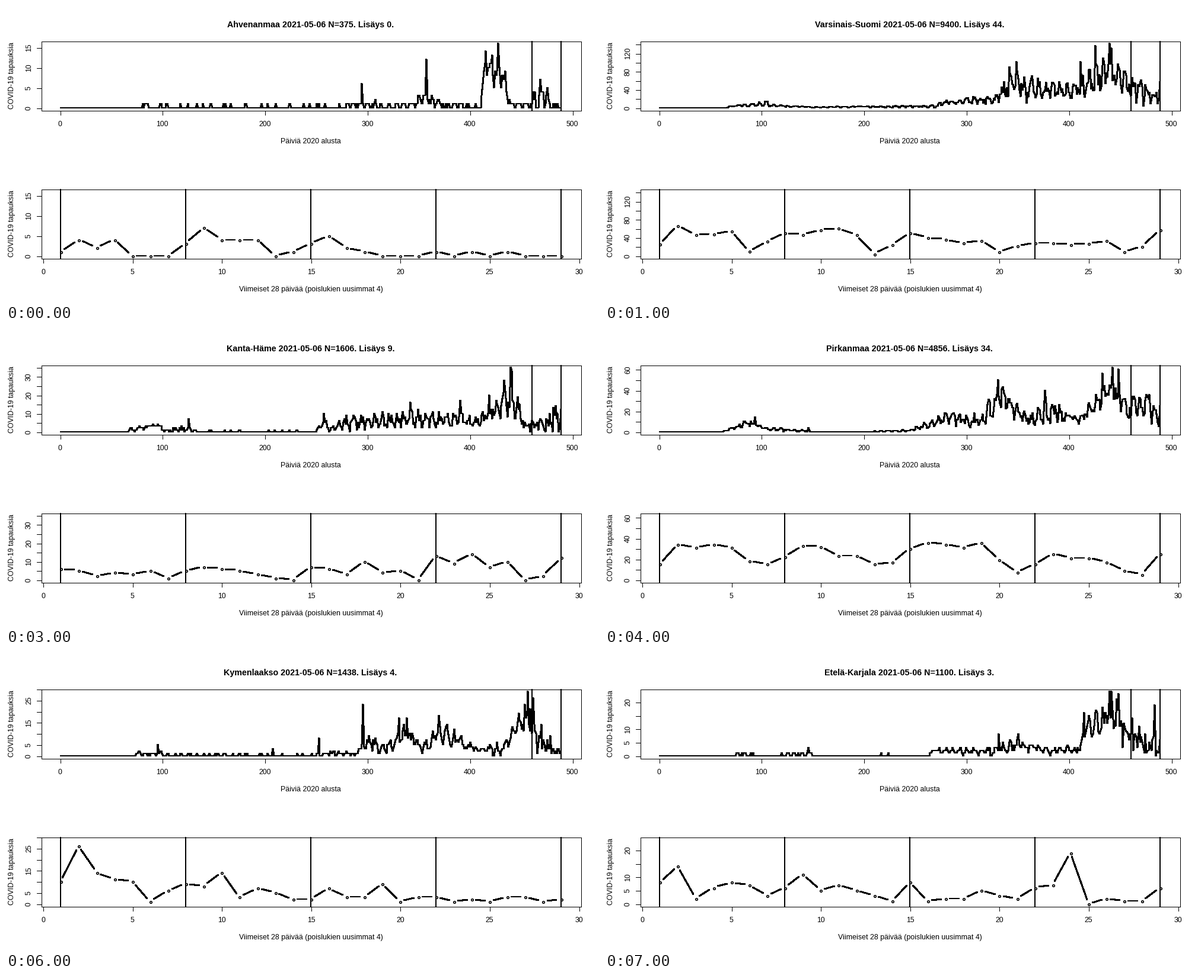
These frames come from a looping animation (1000x500 px, 8000 ms). A matplotlib script:

```python
import numpy as np
import matplotlib.pyplot as plt
from matplotlib.animation import FuncAnimation

plt.rcParams["font.family"] = "Liberation Sans"
plt.rcParams["path.simplify"] = False

W, H, DPI = 1000, 500, 100
PT = 72 / DPI                      # points per pixel
LEFT, RIGHT = 59.04, 969.76        # plot box, pixels
TOP, HEIGHT = 59.04, 117.52
DAYS, WINDOW = 489, 29
GAP = 7.2                          # clearance between markers and lines

regions = []


def region(name, total, added, trend, spikes, recent=()):
    """Daily counts: a weekly weave between low and high, fixed spikes, known last days."""
    rng = np.random.default_rng(total)
    day = np.arange(1, DAYS + 1)
    knots, low, high = np.array(trend).T
    weave = 0.5 + 0.3 * np.cos(2 * np.pi * day / 7) + rng.uniform(-0.35, 0.35, DAYS)
    low, high = np.interp(day, knots, low), np.interp(day, knots, high)
    counts = np.rint(low + (high - low) * np.clip(weave, 0, 1))
    for when, value in spikes.items():
        counts[when - 1] = value
    peak = max(spikes.values())
    if recent:
        counts[-WINDOW:] = recent
    title = f"{name} 2021-05-06 N={total}. Lisäys {added}."
    regions.append((title, np.minimum(counts, peak), peak))


region(
    "Ahvenanmaa", 375, 0,
    [(78, 0, 0), (82, 0, 2), (87, 0, 0.6), (270, 0, 0.55), (308, 0, 2), (314, 0, 0.6),
     (340, 0, 1), (357, 0, 5), (375, 0, 1), (411, 0, 0.7), (415, 7, 13), (430, 4, 12),
     (440, 0, 1)],
    {295: 6, 358: 12, 416: 14, 422: 13, 428: 16, 435: 9},
    (1, 4, 2, 4, 0, 0, 0, 3, 7, 4, 4, 4, 0, 1, 3, 5, 2, 1, 0, 0, 0, 1, 0, 1, 0, 1, 0, 0, 0))

region(
    "Varsinais-Suomi", 9400, 44,
    [(67, 0, 0), (70, 1, 5), (105, 3, 15), (112, 1, 7), (155, 0, 2), (271, 0, 6),
     (274, 5, 14), (328, 9, 30), (348, 25, 90), (380, 20, 55), (410, 18, 65),
     (440, 45, 120), (460, 24, 75)],
    {342: 90, 349: 102, 359: 10, 412: 102, 426: 136, 440: 142, 442: 132},
    (26, 66, 47, 48, 54, 10, 32, 50, 47, 57, 61, 46, 4, 24, 50, 40, 36, 28, 33, 9, 22, 28,
     28, 25, 27, 33, 9, 20, 57))

region(
    "Satakunta", 1437, 5,
    [(70, 0, 0), (95, 0, 3), (130, 0, 0.6), (250, 0, 0.6), (305, 1, 10), (390, 0, 6),
     (440, 6, 22), (489, 0, 7)],
    {434: 24, 481: 0})

region(
    "Kanta-Häme", 1606, 9,
    [(63, 0, 0), (70, 0, 2), (96, 2, 5), (101, 0, 2), (129, 0, 3), (133, 0, 0.6),
     (250, 0, 0.6), (258, 2, 8), (264, 0, 2), (278, 0, 9), (345, 2, 12), (410, 3, 9),
     (440, 8, 30), (455, 0, 7)],
    {126: 7, 258: 10, 342: 16, 391: 17, 419: 20, 434: 28, 440: 35, 441: 33},
    (6, 5, 2, 4, 3, 5, 1, 5, 7, 6, 5, 3, 1, 0, 7, 6, 3, 10, 4, 5, 0, 13, 9, 14, 7, 10, 0, 2, 12))

region(
    "Pirkanmaa", 4856, 34,
    [(62, 0, 0), (86, 5, 12), (105, 0, 5), (135, 0, 2), (155, 0, 0), (205, 0, 0.5),
     (245, 0, 2), (278, 5, 18), (315, 3, 18), (331, 18, 48), (362, 5, 18), (385, 9, 32),
     (410, 7, 14), (440, 27, 57), (460, 12, 30)],
    {94: 14, 146: 4, 331: 50, 377: 40, 433: 56, 443: 62, 449: 60},
    (15, 34, 31, 34, 31, 18, 15, 22, 33, 32, 23, 23, 15, 17, 30, 36, 34, 31, 36, 19, 7, 15,
     25, 21, 21, 17, 9, 5, 25))

region(
    "Päijät-Häme", 3378, 16,
    [(68, 0, 0), (90, 0, 5), (130, 0, 0.6), (245, 0, 0.6), (300, 1, 9), (340, 4, 22),
     (385, 2, 16), (440, 16, 50), (489, 7, 24)],
    {344: 24, 441: 56})

region(
    "Kymenlaakso", 1438, 4,
    [(71, 0, 0), (78, 0, 2), (98, 0, 2), (110, 0, 0.7), (250, 0, 0.55), (268, 0, 2.5),
     (288, 0, 1), (303, 3, 10), (314, 0, 5), (336, 4, 15), (354, 1, 5), (370, 5, 16),
     (412, 1, 4), (432, 0, 6), (456, 11, 25)],
    {96: 5, 208: 3, 253: 8, 296: 23, 331: 17, 339: 17, 370: 18, 457: 29},
    (10, 26, 14, 11, 10, 1, 6, 9, 8, 14, 3, 7, 5, 2, 2, 7, 3, 3, 9, 1, 3, 3, 1, 2, 1, 3, 3, 1, 2))

region(
    "Etelä-Karjala", 1100, 3,
    [(62, 0, 0), (82, 0, 1.5), (104, 0, 0), (122, 0, 0.6), (146, 0, 1.5), (152, 0, 0),
     (222, 0, 0.6), (264, 0, 0), (267, 1, 3), (326, 0, 3), (352, 2, 7), (376, 0, 3),
     (412, 1, 4), (415, 7, 14), (446, 8, 22), (460, 6, 10)],
    {146: 3, 332: 8, 351: 8, 415: 16, 440: 24, 442: 24, 449: 23, 453: 3},
    (8, 14, 2, 6, 8, 7, 3, 6, 11, 5, 7, 5, 3, 1, 8, 1, 2, 2, 5, 3, 2, 6, 7, 19, 0, 2, 1, 1, 6))


fig = plt.figure(figsize=(W / DPI, H / DPI), dpi=DPI, facecolor="white")
ax = fig.add_axes([0, 0, 1, 1])


def stroke(x, y, width=1):
    """Aliased line on the pixel grid."""
    shift = 0.5 * (width % 2)
    ax.plot(np.floor(x) + shift, np.floor(y) + shift, color="black", lw=width * PT,
            antialiased=False, solid_capstyle="round" if width > 1 else "projecting",
            solid_joinstyle="round")


def label(x, y, text, size=12.2, **style):
    ax.text(x, y, text, fontsize=size * PT, ha="center", va="baseline",
            rotation_mode="anchor", color="black", **style)


def panel(top, span, peak, xticks, xlabel, marks):
    """Draw box, axes and vertical marks; return the data-to-pixel mappings."""
    bottom = top + HEIGHT
    pad = 0.04 * (span - 1)

    def px(v):
        return LEFT + (v - 1 + pad) / (span - 1 + 2 * pad) * (RIGHT - LEFT)

    def py(v):
        return bottom - (v / peak + 0.04) / 1.08 * HEIGHT

    stroke([LEFT, RIGHT, RIGHT, LEFT, LEFT], [top, top, bottom, bottom, top])
    for v in xticks:
        stroke([px(v)] * 2, [bottom, bottom + 7.2])
        label(px(v), bottom + 26.5, str(v))

    step = next(s for s in (1, 2, 5, 10, 20, 50) if peak / s < 7.5)
    free = np.inf
    for v in range(0, int(peak * 1.04) + 1, step):
        y = py(v)
        stroke([LEFT - 7.2, LEFT], [y, y])
        half = len(str(v)) * 3.335
        if y + half < free:        # skip labels that would crowd the previous one
            label(42, y, str(v), rotation=90)
            free = y - half - 10

    middle = (LEFT + RIGHT) / 2 - 0.5
    label(middle, bottom + 55.5, xlabel, 12.4)
    label(13, top + HEIGHT / 2 - 0.5, "COVID-19 tapauksia", rotation=90)
    for v in marks:
        stroke([px(v)] * 2, [top + 1, bottom], 2)
    return px, py


def broken_line(x, y):
    """Segments between points, trimmed at both ends, plus small rings."""
    dx, dy = np.diff(x), np.diff(y)
    length = np.hypot(dx, dy)
    ux, uy = GAP * dx / length, GAP * dy / length
    blank = np.full(len(dx), np.nan)
    stroke(np.column_stack([x[:-1] + ux, x[1:] - ux, blank]).ravel(),
           np.column_stack([y[:-1] + uy, y[1:] - uy, blank]).ravel(), 2)
    ax.plot(np.floor(x) + 0.5, np.floor(y) + 0.5, "o", ms=3.6 * PT, mew=1.6 * PT,
            mfc="none", mec="black", antialiased=False)


def draw(frame):
    title, counts, peak = regions[frame]
    ax.clear()
    ax.set(xlim=(0, W), ylim=(H, 0))
    ax.axis("off")
    label((LEFT + RIGHT) / 2 - 1, 36, title, 14.25, weight="bold")

    px, py = panel(TOP, DAYS, peak, range(0, 501, 100), "Päiviä 2020 alusta",
                   (DAYS - WINDOW + 1, DAYS))
    stroke(px(np.arange(1, DAYS + 1)), py(counts), 2)

    px, py = panel(TOP + 250, WINDOW, peak, range(0, 31, 5),
                   "Viimeiset 28 päivää (poislukien uusimmat 4)", range(1, 30, 7))
    broken_line(px(np.arange(1, WINDOW + 1)), py(counts[-WINDOW:]))
    return ax.get_children()


anim = FuncAnimation(fig, draw, frames=len(regions), interval=1000,
                     init_func=lambda: draw(0), repeat=True, repeat_delay=0, blit=False)
plt.show()
```
